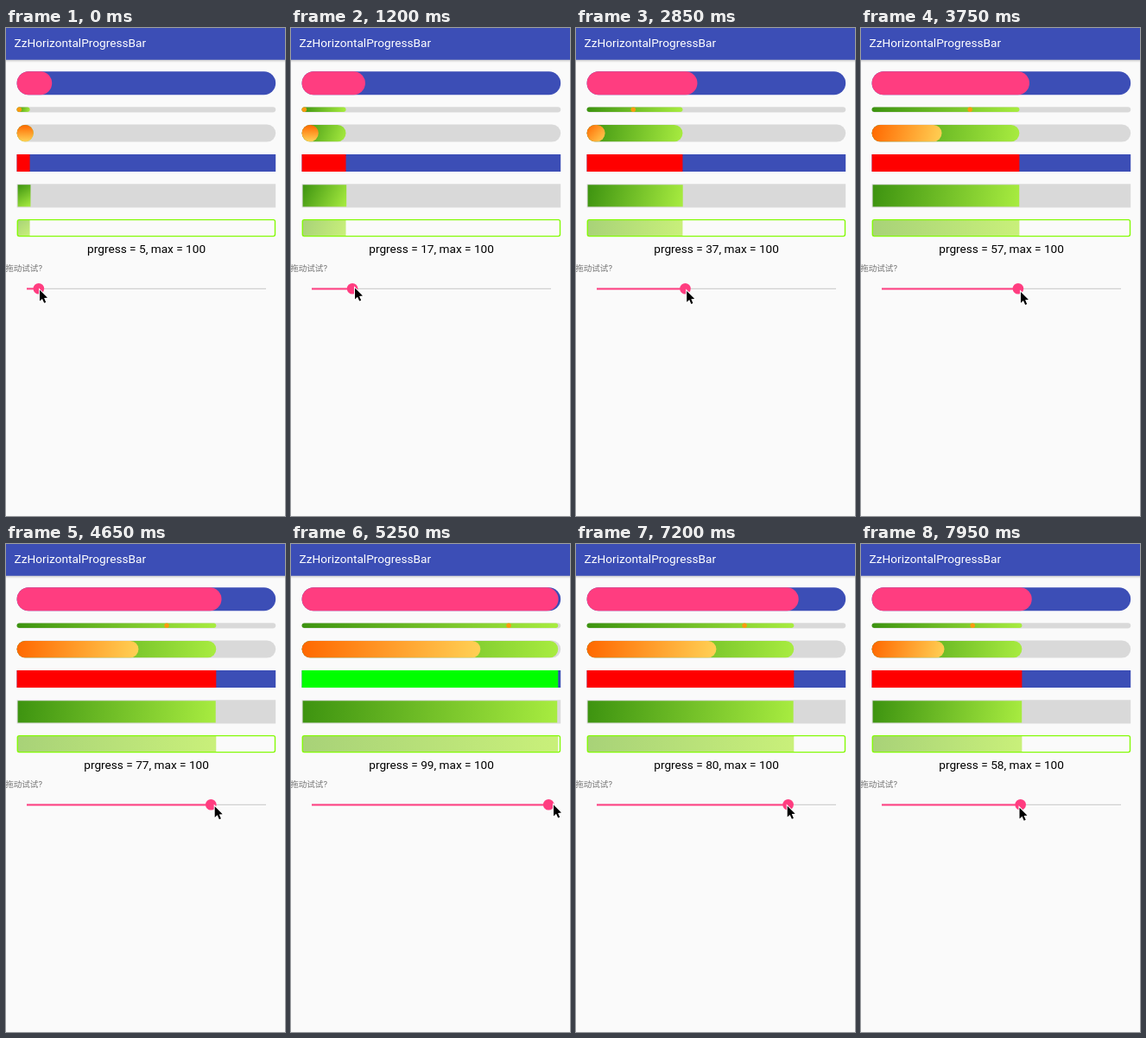
These frames come from a looping animation (323x564 px, 8 s). An HTML page with a canvas:

```html
<!DOCTYPE html>
<html lang="zh-CN">
<head>
<meta charset="utf-8">
<title>ZzHorizontalProgressBar</title>
<style>
  html, body { margin: 0; width: 100%; height: 100%; overflow: hidden; background: #fafafa; }
  canvas { display: block; width: 323px; height: 564px; }
</style>
</head>
<body>
<canvas id="stage"></canvas>
<script>
const WIDTH = 323, HEIGHT = 564, LOOP = 8000, STEP = 150;
const BLUE = '#3c4eb6', PINK = '#ff3d80', GREY = '#d9d9d9';
const GREEN = ['#3d9310', '#a8ec40'], ORANGE = ['#ff6800', '#ffd155'], PALE = ['#a8d278', '#c9f07a'];
const LEFT = 12.6, SPAN = 299.6;
const TRACK = 24, UNIT = 2.77, LAG = 40;

// Where the pointer turns or changes speed: time, x
const DRAG = [
  [0, 38], [900, 69], [1050, 69], [1200, 73], [2850, 127.2], [4650, 240.7], [5250, 303],
  [5700, 306], [5850, 312], [6090, 296], [6750, 273], [7200, 243.7], [7950, 182.5]
];

const canvas = document.getElementById('stage');
const ctx = canvas.getContext('2d');
const ratio = window.devicePixelRatio || 1;
canvas.width = WIDTH * ratio;
canvas.height = HEIGHT * ratio;

function pointerX(time) {
  const i = Math.max(1, DRAG.findIndex(key => key[0] >= time));
  const [t0, x0] = DRAG[i - 1], [t1, x1] = DRAG[i];
  return x0 + (x1 - x0) * (time - t0) / (t1 - t0);
}

const pointerY = time => 301 - 2.2 * Math.sin(2 * Math.PI * time / 4800);

// The slider follows the pointer slightly late
function progressAt(time) {
  const x = pointerX(Math.max(0, time - LAG));
  return Math.min(100, Math.round((x - TRACK) / UNIT));
}

function rect(x, y, w, h, fill, radius = 0) {
  ctx.fillStyle = fill;
  ctx.beginPath();
  ctx.roundRect(x, y, w, h, radius);
  ctx.fill();
}

const pill = (x, y, w, h, fill) => rect(x, y, Math.max(w, h), h, fill, h / 2);

function diagonal(x, y, w, h, [from, to]) {
  const g = ctx.createLinearGradient(x, y, x + w, y + h);
  g.addColorStop(0, from);
  g.addColorStop(1, to);
  return g;
}

const gradientRect = (x, y, w, h, colors) => rect(x, y, w, h, diagonal(x, y, w, h, colors));
const gradientPill = (x, y, w, h, colors) => pill(x, y, w, h, diagonal(x, y, w, h, colors));

function label(text, x, y, size, color, align = 'left') {
  ctx.font = `${size}px Roboto, "Noto Sans CJK SC", "Noto Sans CJK", sans-serif`;
  ctx.textAlign = align;
  ctx.fillStyle = color;
  ctx.fillText(text, x, y);
}

function appBar() {
  const shadow = ctx.createLinearGradient(0, 36, 0, 40);
  shadow.addColorStop(0, 'rgba(0,0,0,.22)');
  shadow.addColorStop(1, 'rgba(0,0,0,0)');
  rect(0, 36, WIDTH, 4, shadow);
  rect(0, 0, WIDTH, 36.7, BLUE);
  label('ZzHorizontalProgressBar', 9.6, 22, 13.65, '#fff');
}

function bars(progress) {
  const part = progress / 100, width = SPAN * part;
  const behind = gap => SPAN * Math.max(0, part - gap);

  pill(LEFT, 50.3, SPAN, 27, BLUE);
  pill(LEFT, 50.3, 27 + (SPAN - 27) * part, 27, PINK);

  pill(LEFT, 91.2, SPAN, 6.3, GREY);
  gradientPill(LEFT, 91.6, width, 5.5, GREEN);
  pill(LEFT + behind(.2), 91.6, 5.5, 5.5, '#fb9a10');

  pill(LEFT, 111.6, SPAN, 20, GREY);
  gradientPill(LEFT, 112, width, 19.2, GREEN);
  gradientPill(LEFT, 112, behind(.3), 19.2, ORANGE);

  rect(LEFT, 146, SPAN, 20, BLUE);
  rect(LEFT, 146, width, 20, progress > 80 ? '#00ff00' : '#ff0000');

  rect(LEFT, 180.2, SPAN, 27.3, GREY);
  gradientRect(LEFT + 1, 181.2, (SPAN - 2) * part, 25.3, GREEN);

  gradientRect(LEFT + 1, 222, width - 1, 18.5, PALE);
  ctx.strokeStyle = '#84fa08';
  ctx.lineWidth = 1.4;
  ctx.beginPath();
  ctx.roundRect(LEFT + .7, 221.6, SPAN - 1.4, 19, 2);
  ctx.stroke();
}

function slider(progress) {
  const thumb = TRACK + UNIT * progress;
  rect(TRACK, 300.7, 100 * UNIT, 1.4, '#d0d0d0');
  rect(TRACK, 300.4, thumb - TRACK, 2, PINK);
  ctx.beginPath();
  ctx.arc(thumb, 301.3, 6.3, 0, 2 * Math.PI);
  ctx.fill();
}

const arrow = new Path2D('M1 1.8V14.6L4 11.9L6.2 16.8L8.2 15.9L6.1 11.1L10 10.8Z');

function pointer(x, y) {
  ctx.save();
  ctx.translate(x, y);
  ctx.lineWidth = 2;
  ctx.strokeStyle = '#fff';
  ctx.stroke(arrow);
  ctx.fillStyle = '#000';
  ctx.fill(arrow);
  ctx.restore();
}

function draw(elapsed) {
  const time = Math.floor((elapsed % LOOP) / STEP) * STEP;
  const progress = progressAt(time);
  ctx.setTransform(ratio, 0, 0, ratio, 0, 0);
  rect(0, 0, WIDTH, HEIGHT, '#fafafa');
  appBar();
  bars(progress);
  label(`prgress = ${progress}, max = 100`, 162.6, 259.7, 13.65, '#000', 'center');
  label('拖动试试?', -.8, 281.3, 9.55, '#757575');
  slider(progress);
  pointer(pointerX(time), pointerY(time));
}

const start = performance.now();
function frame() {
  draw(performance.now() - start);
  requestAnimationFrame(frame);
}
frame();
</script>
</body>
</html>
```
